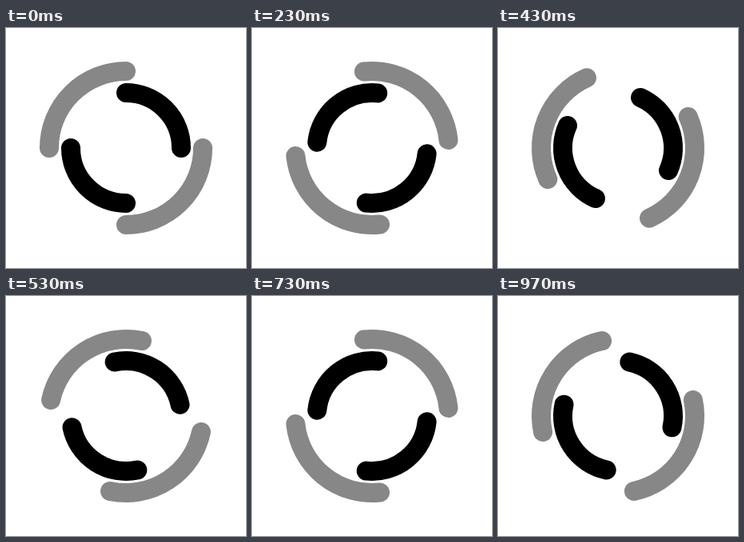
An HTML page that plays this animation: 300x300 px, repeating every 1 s.

```html
<!DOCTYPE html>
<html lang="en">
<head>
<meta charset="utf-8">
<title>Double ring loader</title>
<style>
  html, body { margin: 0; width: 100%; height: 100%; overflow: hidden; background: #fff; }
  svg { display: block; width: 100%; height: 100%; }
  path { fill: none; stroke-width: 24; stroke-linecap: round; }
</style>
</head>
<body>
<svg viewBox="-150 -150 300 300">
  <path id="outer" stroke="#878787" d="M-96 0A96 96 0 0 1 0-96M96 0A96 96 0 0 1 0 96"/>
  <path id="inner" stroke="#000" d="M0-69A69 69 0 0 1 69 0M0 69A69 69 0 0 1-69 0"/>
</svg>
<script>
  const LOOP = 1000, STEPS = 30;
  const outer = document.getElementById('outer');
  const inner = document.getElementById('inner');
  const turn = (ring, angle) => ring.setAttribute('transform', `rotate(${angle})`);

  // 30 even steps per turn, each starting on a rounded 10 ms tick
  function draw() {
    const tick = Math.floor(performance.now() % LOOP / 10) * 10;
    const step = Math.floor((tick + 4) * STEPS / LOOP);
    const angle = step * 360 / STEPS;
    turn(outer, angle);
    turn(inner, -angle);
    requestAnimationFrame(draw);
  }
  draw();
</script>
</body>
</html>
```
